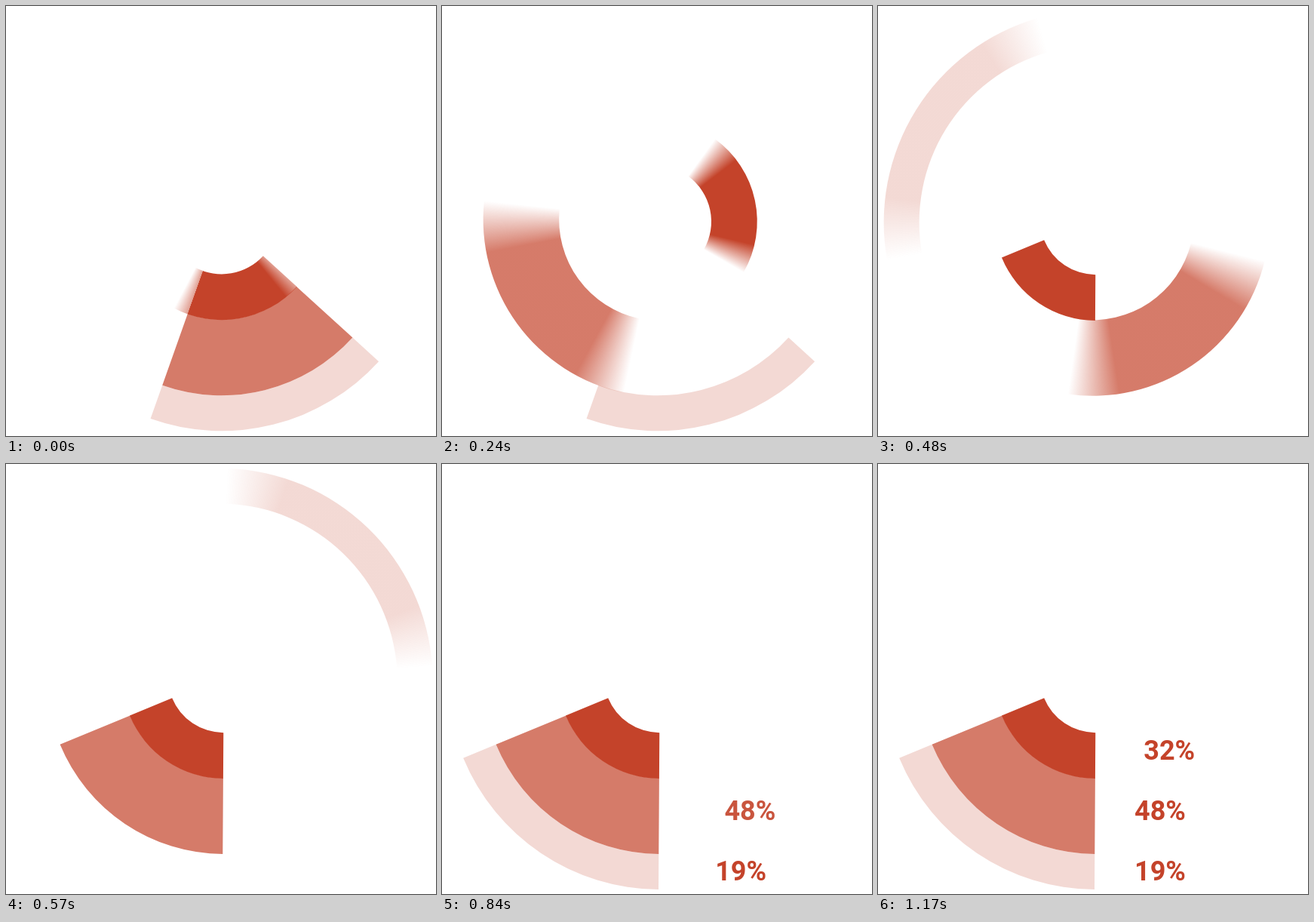
Animation of 570 by 570 pixels, one loop 1200 ms. Source, as an HTML page with a canvas:

```html
<!DOCTYPE html>
<html lang="en">
<head>
<meta charset="utf-8">
<title>Rotating ring segments</title>
<style>
  html, body { margin: 0; width: 100%; height: 100%; overflow: hidden; background: #fff; }
  canvas, svg { position: absolute; left: 0; top: 0; width: 570px; height: 570px; }
  text { font: 700 36px Roboto, sans-serif; fill: #c4432a; }
</style>
</head>
<body>
<canvas id="rings" width="570" height="570"></canvas>
<svg id="labels" viewBox="0 0 570 570"></svg>
<script>
const LOOP = 1200, STEP = 30;
const SHUTTER = 15;                  // motion blur window, ms
const SPIN = 408, SPIN_MS = 360;     // degrees and duration of each turn
const PIVOT = [286.5, 285];
const APEX = [-0.8, -3.7];           // wedge tip relative to the pivot
const FROM = 42.35, WIDTH = 67.15;   // resting wedge, degrees
const SLIDE_MS = 300, FADE_MS = 240, SPEED = 0.41;

const rings = [
  { inner: 235, outer: 282, alpha: 0.2, start: 360 },
  { inner: 134.5, outer: 235, alpha: 0.7, start: 180 },
  { inner: 74.2, outer: 135, alpha: 1, start: 0 }
];
const labels = [
  { text: '32%', y: 392, end: 1200 },
  { text: '48%', y: 472, end: 924 },
  { text: '19%', y: 552, end: 894 }
];

const ctx = document.getElementById('rings').getContext('2d');
const svg = document.getElementById('labels');
const clamp = x => Math.min(1, Math.max(0, x));
const rad = d => d * Math.PI / 180;
const ink = a => `rgba(196,67,42,${a})`;

for (const l of labels) {
  l.node = document.createElementNS('http://www.w3.org/2000/svg', 'text');
  l.node.textContent = l.text;
  l.node.setAttribute('y', l.y);
  svg.append(l.node);
}

function apexAt(turn) {
  const c = Math.cos(rad(turn)), s = Math.sin(rad(turn));
  return [PIVOT[0] + APEX[0] * c - APEX[1] * s, PIVOT[1] + APEX[0] * s + APEX[1] * c];
}

// Coverage around the wedge while the shutter is open.
function blurFill(x, y, begin, sweep, before, after, alpha) {
  const g = ctx.createConicGradient(rad(begin), x, y);
  const end = WIDTH + sweep;
  const stops = [
    [0, before], [sweep, 1 - after], [sweep + 0.2, 1],
    [WIDTH, 1], [WIDTH + 0.2, 1 - before], [end, after],
    [end + 1, after], [end + 2, before]
  ];
  for (const [deg, cover] of stops) g.addColorStop(deg / 360, ink(cover * alpha));
  return g;
}

function drawRing({ inner, outer, alpha, start }, t) {
  const open = t - SHUTTER / 2, close = t + SHUTTER / 2;
  const turn = time => SPIN * clamp((time - start) / SPIN_MS);
  const a0 = turn(open), a1 = turn(close);
  const [x, y] = apexAt((a0 + a1) / 2);
  const begin = FROM + a0, sweep = a1 - a0;
  const end = begin + WIDTH + sweep;

  ctx.beginPath();
  ctx.arc(x, y, outer, rad(begin), rad(end));
  ctx.arc(x, y, inner, rad(end), rad(begin), true);
  ctx.closePath();
  if (sweep > 0) {
    const before = clamp((start - open) / SHUTTER);
    const after = clamp((close - start - SPIN_MS) / SHUTTER);
    ctx.fillStyle = blurFill(x, y, begin, sweep, before, after, alpha);
  } else {
    ctx.fillStyle = ink(alpha);
  }
  ctx.fill();
}

function render(t) {
  ctx.clearRect(0, 0, 570, 570);
  for (const r of rings) drawRing(r, t);
  for (const l of labels) {
    const left = Math.max(0, l.end - t);
    l.node.setAttribute('x', 340 + left * SPEED);
    l.node.setAttribute('opacity', clamp((SLIDE_MS - left) / FADE_MS));
  }
}

const t0 = performance.now();
function tick() {
  const t = (performance.now() - t0) % LOOP;
  render(Math.floor(t / STEP) * STEP);
  requestAnimationFrame(tick);
}
tick();
</script>
</body>
</html>
```
